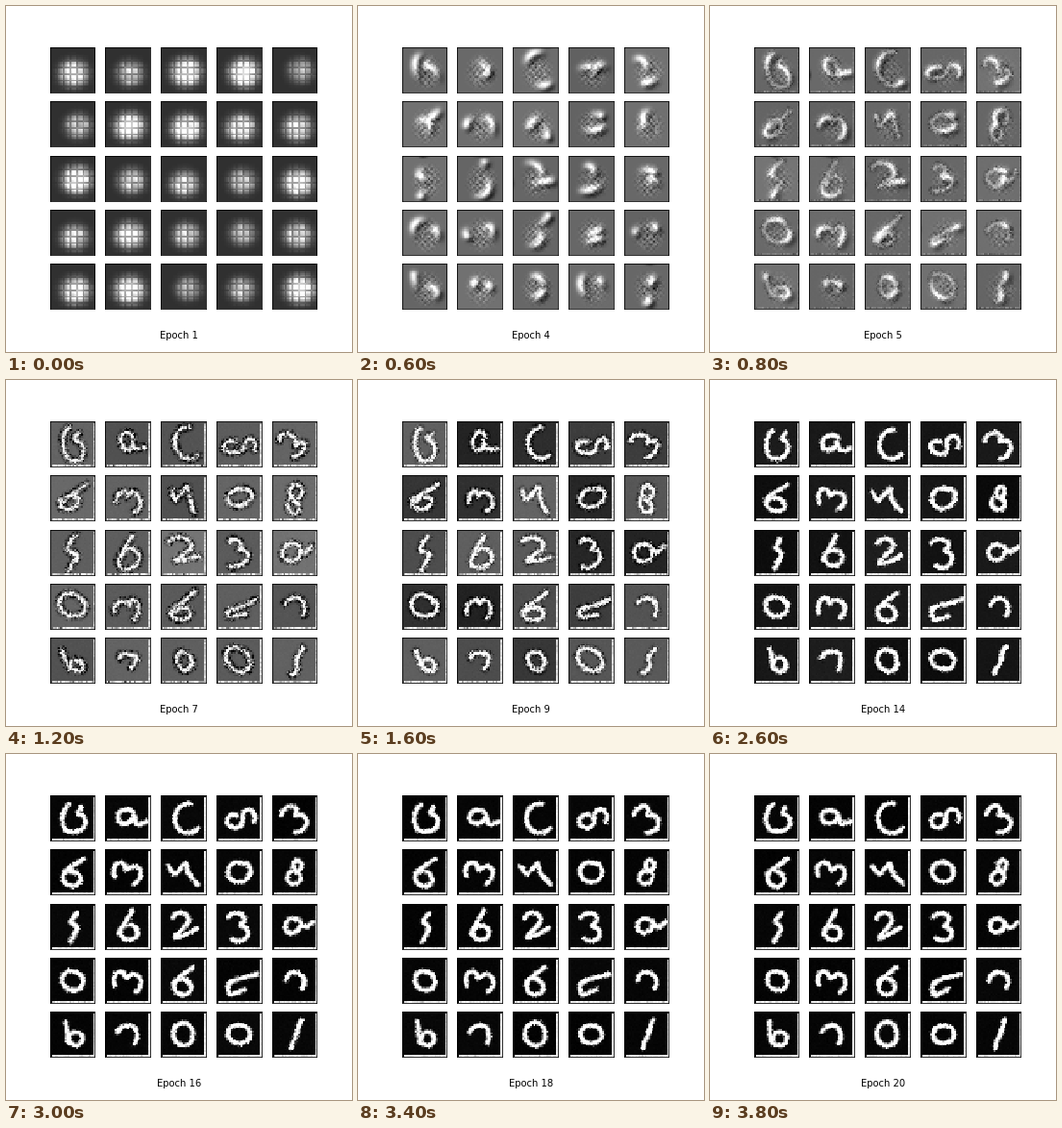
A matplotlib script that plays this animation: 360 by 360 pixels, repeating every 4000 ms.

```python
import numpy as np
import matplotlib.pyplot as plt
from matplotlib.animation import FuncAnimation

N = 28          # pixels per tile side
EPOCHS = 20
MID = 13.5

Y, X = np.mgrid[0:N, 0:N].astype(float)
U, V = X % 4, Y % 4
SEAM = (U == 0) | (V == 0)
CORE = np.exp(-(((X - 15) / 8) ** 2 + ((Y - 15) / 9) ** 2) ** 2)


def arc(x, y, rx, ry, start, end):
    t = np.radians(np.linspace(start, end, 24))
    return np.c_[x + rx * np.cos(t), y + ry * np.sin(t)]


# Pen paths around the tile centre, y pointing down
GLYPHS = {
    "0": [arc(0, 0, 7, 6, -60, 310)],
    "1": [[(4, -9), (1, 0), (-2, 9)]],
    "2": [arc(-2, -4, 5.5, 5, 190, 390), [(-6, 7), (0, 5), (9, 1)]],
    "3": [arc(-1, -4.5, 5, 4, -150, 80), arc(-1, 4, 6, 4.5, -80, 150)],
    "4": [[(-9, -4), (-5, 2), (2, -6), (3, 0), (9, 8)]],
    "5": [[(3, -9), (-2, -3), (3, 1), (1, 5), (-2, 10)]],
    "6": [[(5, -10)], arc(0, 4, 5.5, 5, 200, -180)],
    "7": [arc(0, 1, 6, 6, 190, 400)],
    "8": [arc(1, -4, 3, 4, 90, -270), arc(0, 4, 4, 4.5, -90, 250)],
    "9": [arc(-1, -1, 5, 4.5, -20, -380), [(5, 4), (12, 2)]],
    "C": [arc(3, 0, 8.5, 9.5, -80, -320)],
    "G": [arc(-1, 0, 5.5, 9, -100, -270), arc(2, 3, 6, 6, 90, -60), [(2, -2), (5, -7)]],
    "L": [[(11, -4), (-2, 0), (-7, 3), (-6, 9), (4, 5)]],
    "b": [[(-5, -8), (-3, 6)], arc(2, 3, 4.5, 4, 160, -200)],
    "s": [arc(-3, 2, 5, 4, -60, -380), arc(6, 0, 4, 5, 200, 400)],
}

# Glyph and tilt in degrees for each tile
LAYOUT = """G:0 9:0 C:0 s:0 3:-40
            6:15 3:-70 4:0 0:0 8:10
            5:0 6:-10 2:0 3:-10 9:-25
            0:30 3:-75 6:10 L:0 7:0
            b:0 7:10 0:80 0:15 1:0"""


def trace(parts, tilt, count=64, smooth=7):
    """Even samples along a softened, turned path."""
    p = np.vstack(parts)
    run = np.r_[0, np.cumsum(np.hypot(*np.diff(p, axis=0).T))]
    t = np.linspace(0, run[-1], count)
    kernel = np.ones(smooth) / smooth
    x, y = (np.convolve(np.pad(np.interp(t, run, p[:, k]), smooth // 2, mode="edge"),
                        kernel, "valid") for k in (0, 1))
    c, s = np.cos(np.radians(tilt)), np.sin(np.radians(tilt))
    return MID + np.c_[c * x - s * y, s * x + c * y]


PATHS = []
for token in LAYOUT.split():
    name, tilt = token.split(":")
    PATHS.append(trace(GLYPHS[name], float(tilt)))


def morph(k, epoch):
    """Bend a path with slow waves that calm down over the epochs."""
    rng = np.random.default_rng(k)
    path = PATHS[k]
    t = np.linspace(0, 2 * np.pi, len(path))
    amp = np.interp(epoch, [4, 8, 12, 16, 20], [1.6, 1.4, 1, .4, .5])
    bend = np.zeros_like(path)
    for h in (.5, 1.3):
        phase = rng.uniform(0, 2 * np.pi, 2)
        bend += np.sin(h * t[:, None] + phase + .25 * (epoch - 16))
    return path + .7 * amp * bend


def distance(path):
    return np.hypot(X[..., None] - path[:, 0], Y[..., None] - path[:, 1])


def dawn(k, rng):
    """Bright lumpy patch cut by a regular lattice."""
    gain = np.random.default_rng(k + 7).uniform(.6, 1.5)
    cx, cy = 15.5 + rng.normal(0, .8, 2)
    size = 6.5 + 1.8 * gain
    r = ((X - cx) / size) ** 2 + ((Y - cy) / (size * .9)) ** 2
    patch = np.exp(-r ** 1.5)
    lumps = np.kron(rng.uniform(.75, 1.15, (7, 7)), np.ones((4, 4)))
    bevel = np.where(SEAM, .45, .8 + .08 * (U - V + 1)) * lumps
    return .19 + .03 * SEAM * CORE + gain * .9 * bevel * patch


def blobs(path, rng):
    """Soft, broken white mass with a dark lower rim and a woven grain."""
    t = np.linspace(0, 1, len(path))
    ink = np.clip(np.sin(2 * np.pi * (1.5 * t + rng.random())), 0, 1)
    mass = (ink * np.exp(-(distance(path) / 2.4) ** 2)).max(-1)
    rim = np.roll(mass, (2, 2), (0, 1)) * (1 - mass)
    weave = np.cos(np.pi * X / 2 + np.pi * (Y // 2 % 2)) * np.cos(np.pi * Y)
    grain = CORE * (.1 * weave + .07 * rng.normal(0, 1, (N, N)) + .05)
    return rng.uniform(.38, .45) + grain + .62 * mass - .4 * rim


def strokes(path, epoch, rng):
    """Rough pen stroke on a darkening ground, with bright edges."""
    bg = np.interp(epoch, [4, 7, 9, 11, 14, 16, 20],
                   [.43, .39, .26, .13, .08, .025, .02])
    bg *= rng.uniform(.8, 1.2) if epoch < 9 else rng.uniform(.5, 1.5)
    young = np.interp(epoch, [7, 11], [1, 0])
    rough = np.interp(epoch, [7, 11, 20], [.55, .35, .25])
    noise = rng.normal(0, 1, (N, N))
    dist = distance(path).min(-1)
    body = np.clip(1.95 - .5 * young - dist + rough * noise, 0, 1)
    halo = np.exp(-((dist - 2) / 1.1) ** 2)
    img = bg + (1 - bg) * body + .005 * noise
    img -= young * .5 * halo * rng.random((N, N)) ** 2
    img += .12 * rough * halo * rng.normal(0, 1, (N, N))

    edge = np.interp(epoch, [6, 7, 11], [.5, .8, .93])
    spread = np.interp(epoch, [7, 11, 20], [.2, .12, .06])
    img[-1, 1:] = edge + rng.normal(0, spread, N - 1)
    img[1:, -1] = edge + rng.normal(0, spread / 3, N - 1)
    return img


def render(k, epoch):
    rng = np.random.default_rng(1000 + EPOCHS * k + epoch)
    first = np.interp(epoch, [1, 3], [1, 0])
    last = np.interp(epoch, [4, 7], [0, 1])
    path = morph(k, epoch)
    img = (1 - first - last) * blobs(path, rng)
    img += first * dawn(k, rng) + last * strokes(path, epoch, rng)
    return np.clip(img, 0, 1)


fig, axes = plt.subplots(5, 5, figsize=(5, 5), dpi=72)
fig.subplots_adjust(left=.125, right=.9, bottom=.125, top=.88,
                    wspace=.2, hspace=.2)
tiles = []
for ax in axes.flat:
    ax.set_xticks([])
    ax.set_yticks([])
    tiles.append(ax.imshow(np.zeros((N, N)), cmap="gray", vmin=0, vmax=1,
                           interpolation="nearest"))
label = fig.text(.5, .04, "", ha="center", fontsize=10, family="DejaVu Sans")


def update(i):
    for k, tile in enumerate(tiles):
        tile.set_data(render(k, i + 1))
    label.set_text(f"Epoch {i + 1}")
    return [*tiles, label]


anim = FuncAnimation(fig, update, frames=EPOCHS, interval=200, repeat=True)
plt.show()
```
